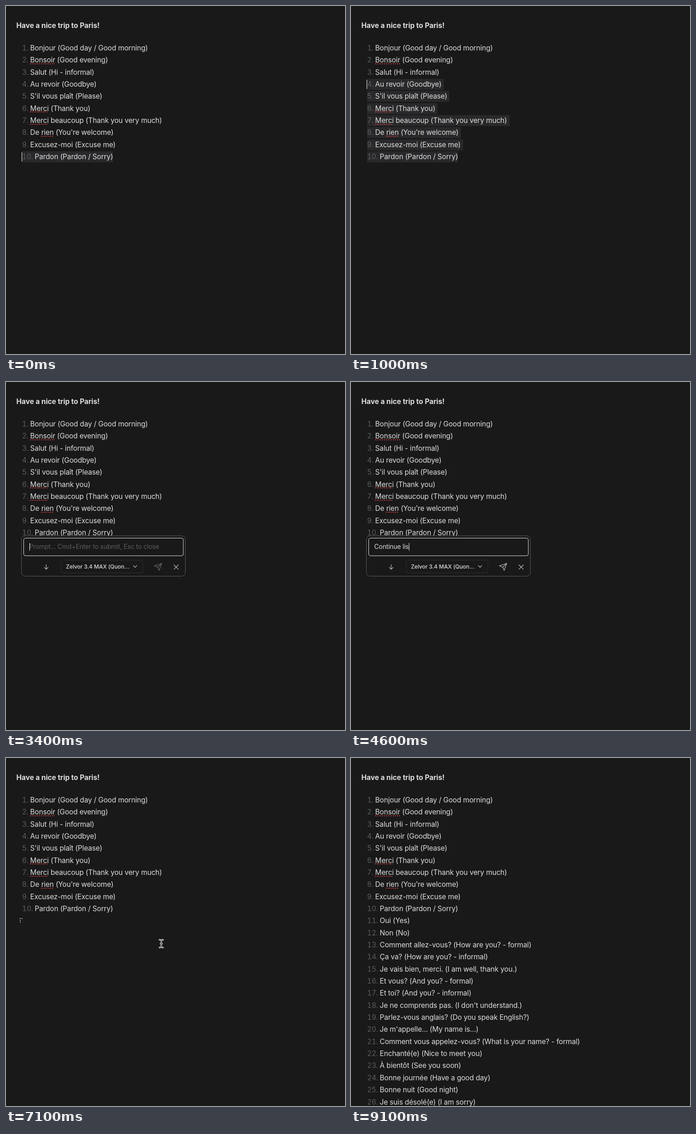
Recreate the animation shown at these times as an HTML page. Size 738 by 759 pixels, loop 9300 ms.

```html
<!DOCTYPE html>
<html lang="en">
<head>
<meta charset="utf-8">
<title>Continue list</title>
<style>
html, body { margin: 0; width: 100%; height: 100%; overflow: hidden; background: #191919; }
#stage {
  position: relative; width: 738px; height: 759px; overflow: hidden;
  background: #191919; color: #dedede;
  font: 430 15.5px/24px Inter, "Open Sans", sans-serif;
  font-optical-sizing: none; letter-spacing: -.17px; white-space: pre;
}
#stage > *, #popup > * { position: absolute; }
h1 { margin: 0; left: 22.5px; top: 31px; font-size: inherit; font-weight: 700; letter-spacing: -.05px; }
.row { left: 35px; height: 24px; padding-right: 5px; }
.row.last { padding-right: 0; }
.row.sel { background: #29292b; }
.num { display: inline-block; width: 17.6px; color: #5c5c5c; font-feature-settings: "tnum"; }
.num.wide { width: 27.6px; }
u { text-decoration: underline dotted #c23b3b 1.5px; text-underline-offset: 2px; text-decoration-skip-ink: none; }
#caret { left: 34px; width: 1px; height: 20px; background: #eee; }

#popup { inset: 0; animation: popup 9300ms infinite; }
@keyframes popup {
  0%, 24.52% { opacity: 0; transform: translateY(-10px); animation-timing-function: ease; }
  26.67%, 59.13% { opacity: 1; transform: none; }
  59.14%, 100% { opacity: 0; transform: none; }
}
#popup svg { left: 0; top: 0; fill: none; stroke-linecap: round; stroke-linejoin: round; }
#field { stroke: #2d2d2d; }
#field.focus { stroke: #e4e4e4; }
#send { stroke: #666; }
#send.ready { stroke: #b4b4b4; }
#send.hover { stroke: #fff; }
#send rect { stroke: none; }
#send.hover rect { fill: #555a61; }
#send.down rect { stroke: #eee; }
#prompt, #hint { left: 50.5px; top: 347px; font-size: 13.9px; letter-spacing: -.15px; }
#hint { color: #5c5c5c; }
#bar { display: inline-block; width: 1px; height: 17px; background: #eee; vertical-align: -3.5px; }
#model { left: 130.5px; top: 390.5px; font-size: 12px; font-weight: 500; letter-spacing: -.05px; }

#spinner { left: 30px; top: 349px; }
#spinner i { position: absolute; width: 2px; height: 2px; border-radius: 50%; background: #dedede; }
#arrow { left: 0; top: 0; animation: arrow 9300ms infinite; }
@keyframes arrow {
  0%, 50.53% { visibility: hidden; transform: translate(412px, 462px); }
  50.54% { visibility: visible; transform: translate(412px, 462px); animation-timing-function: ease-out; }
  55.4%, 59.13% { visibility: visible; transform: translate(338px, 404px); }
  59.14%, 100% { visibility: hidden; transform: translate(338px, 404px); }
}
#beam { left: 331px; top: 394px; fill: none; stroke-linecap: round; }
</style>
</head>
<body>
<div id="stage">
  <h1>Have a nice trip to Paris!</h1>
  <div id="caret"></div>
  <div id="spinner"></div>
  <div id="popup">
    <svg width="738" height="759">
      <rect x="33.5" y="335.5" width="357" height="88" rx="8" fill="#191919" stroke="#5a5a5a"/>
      <rect id="field" x="38.5" y="340.5" width="347.5" height="38.5" rx="4"/>
      <path d="M87.5 398.5v10m-4-4l4 4 4-4" stroke="#b4b4b4" stroke-width="1.3"/>
      <rect x="120" y="388.5" width="178" height="28" rx="4" stroke="#2f2f2f"/>
      <path d="M277.3 400.5l3.7 3.7 3.7-3.7" stroke="#b4b4b4" stroke-width="1.3"/>
      <g id="send">
        <rect x="315.5" y="388.5" width="31" height="30.5" rx="4"/>
        <path d="M339 395.5l-5.6 15.5-3.2-7-7.2-3.1zl-8.8 8.5" stroke-width="1.3"/>
      </g>
      <path d="M365.7 399l9.4 9.4m0-9.4l-9.4 9.4" stroke="#bbb" stroke-width="1.3"/>
    </svg>
    <div id="hint">Prompt... Cmd+Enter to submit, Esc to close</div>
    <div id="prompt"><span id="typed"></span><span id="bar"></span></div>
    <div id="model">Zelvor 3.4 MAX (Quon...</div>
  </div>
  <svg id="arrow" width="16" height="22">
    <path d="M.8 1v14.2l3.3-3 2.3 5.4 2.5-1-2.3-5.3h4.6z" fill="#000" stroke="#fff" stroke-width="1.1"/>
  </svg>
  <svg id="beam" width="14" height="22">
    <defs><path id="ibeam" d="M3 2.5q4 0 4 3v11q0 3-4 3M11 2.5q-4 0-4 3m0 11q0 3 4 3M5.3 11h3.4"/></defs>
    <use href="#ibeam" stroke="#fff" stroke-width="2.8"/>
    <use href="#ibeam" stroke="#191919"/>
  </svg>
</div>
<script>
const LOOP = 9300, GIVEN = 10, LINE = 26.34;
// Underscores mark words the spell checker underlines.
const phrases = [
  "Bonjour (Good day / Good morning)", "_Bonsoir_ (Good evening)",
  "Salut (Hi - informal)", "Au revoir (Goodbye)", "S'il vous plaît (Please)",
  "_Merci_ (Thank you)", "_Merci_ beaucoup (Thank you very much)",
  "De _rien_ (You're welcome)", "Excusez-moi (Excuse me)", "Pardon (Pardon / Sorry)",
  "Oui (Yes)", "Non (No)", "Comment allez-vous? (How are you? - formal)",
  "Ça va? (How are you? - informal)", "Je vais bien, merci. (I am well, thank you.)",
  "Et vous? (And you? - formal)", "Et toi? (And you? - informal)",
  "Je ne comprends pas. (I don't understand.)",
  "Parlez-vous anglais? (Do you speak English?)", "Je m'appelle... (My name is...)",
  "Comment vous appelez-vous? (What is your name? - formal)",
  "Enchanté(e) (Nice to meet you)", "À bientôt (See you soon)",
  "Bonne journée (Have a good day)", "Bonne nuit (Good night)",
  "Je suis désolé(e) (I am sorry)"
];
const request = "Continue list";
const spin = "⠋⠙⠹⠸⠼⠴⠦⠧⠇⠏";

const $ = id => document.getElementById(id);
const show = (el, on) => { el.style.visibility = on ? "visible" : "hidden"; };
const rowTop = i => 80 + i * LINE;

let offset = 0;
const rows = phrases.map((text, i) => {
  const el = document.createElement("div");
  const label = `${i + 1}.`;
  el.className = i === GIVEN - 1 ? "row last" : "row";
  el.style.top = rowTop(i) + "px";
  el.innerHTML = `<span class="num${i > 8 ? " wide" : ""}">${label}</span>` +
    `<span>${text.replace(/_(.+?)_/, "<u>$1</u>")}</span>`;
  $("caret").before(el);
  const row = { el, text, body: el.lastChild, start: offset, from: offset + label.length + 1 };
  if (i >= GIVEN) offset = row.from + text.length;
  return row;
});

const dots = [...Array(6)].map((_, i) => {
  const dot = $("spinner").appendChild(document.createElement("i"));
  dot.style.left = (i < 3 ? 0 : 4) + "px";
  dot.style.top = (i % 3) * 4 + "px";
  return dot;
});

function drawSelection(t) {
  const count = t < 2400 ? Math.min(GIVEN, 1 + Math.floor(t / 160)) : 0;
  rows.forEach((row, i) => row.el.classList.toggle("sel", i < GIVEN && i >= GIVEN - count));
  $("caret").style.top = rowTop(GIVEN - count) + 1.5 + "px";
  show($("caret"), t < 2200);
}

function drawPopup(t) {
  const typed = Math.max(0, Math.min(request.length, Math.floor((t - 3500) / 85)));
  const focus = t < 5300, typing = typed > 0 && typed < request.length;
  $("typed").textContent = request.slice(0, typed);
  $("hint").style.display = typed ? "none" : "";
  $("bar").style.opacity = focus && (typing || Math.floor((t - 2380) / 500) % 2 === 0) ? 1 : 0;
  $("field").classList.toggle("focus", focus);
  $("send").classList.toggle("ready", typed > 0);
  $("send").classList.toggle("hover", t > 4980);
  $("send").classList.toggle("down", !focus);
}

function drawAnswer(t) {
  const busy = t >= 5550 && t < 7170;
  // The low bits of a braille code point name its raised dots.
  const code = spin.charCodeAt(Math.floor((t + 30) / 100 + 8) % spin.length);
  dots.forEach((dot, i) => show(dot, busy && code >> i & 1));

  const shown = t < 7170 ? 0 : Math.floor((t - 7170) / 50 + 1) * 27;
  rows.slice(GIVEN).forEach(({ el, body, text, start, from }) => {
    show(el, shown > start);
    body.textContent = text.slice(0, Math.max(0, shown - from));
  });
  show($("beam"), t >= 5500 && t < 8300);
}

let began;
function frame(now) {
  began ??= now;
  const t = (now - began) % LOOP;
  drawSelection(t);
  drawPopup(t);
  drawAnswer(t);
  requestAnimationFrame(frame);
}
requestAnimationFrame(frame);
</script>
</body>
</html>
```
